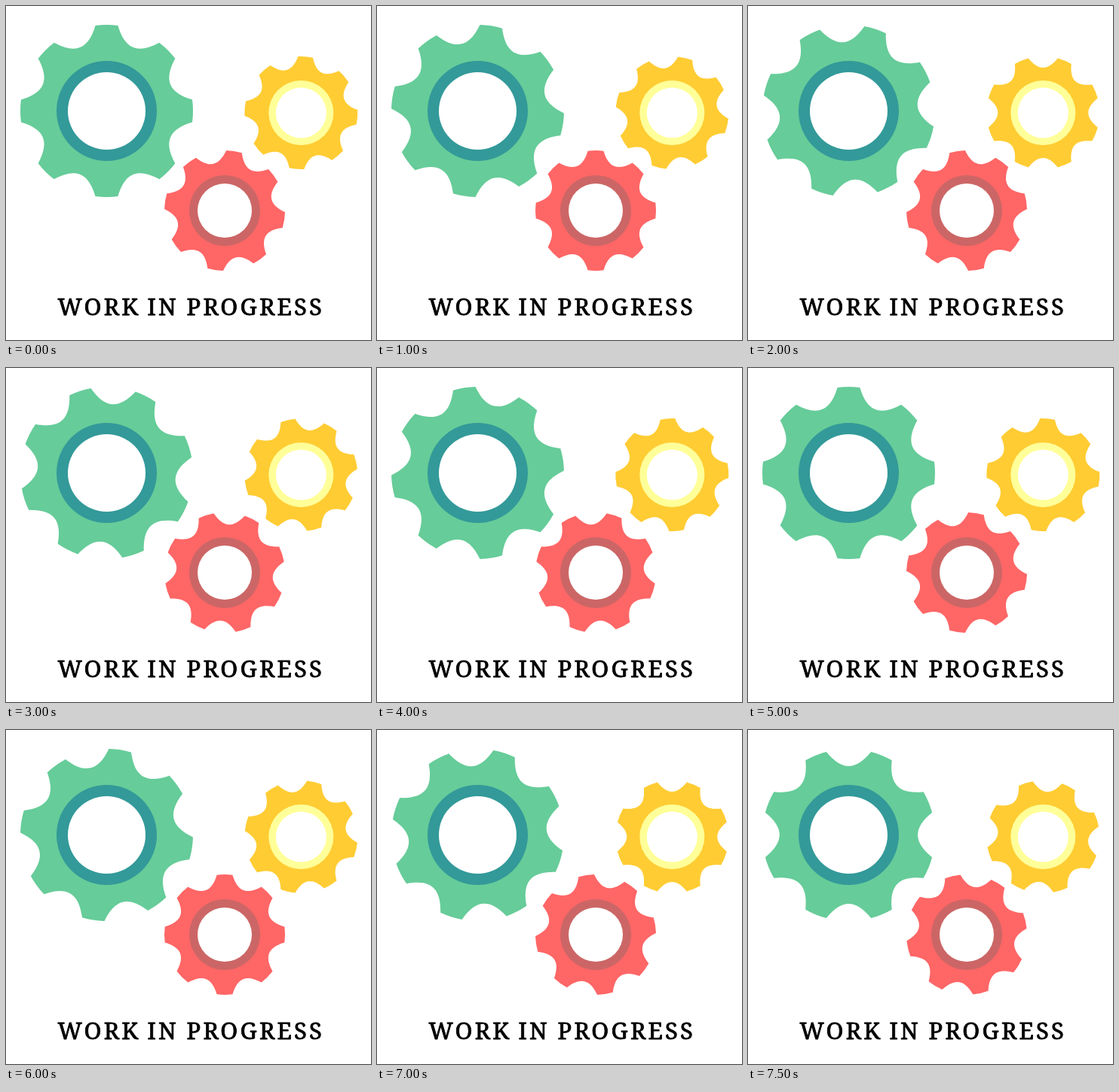
Write an HTML page with a canvas that moves like this. It is 484x444 px and loops after 8 s.

```html
<!DOCTYPE html>
<html lang="en">
<head>
<meta charset="utf-8">
<title>Work in progress</title>
<style>
html, body { margin: 0; width: 100%; height: 100%; overflow: hidden; background: #fff; }
canvas { display: block; }
</style>
</head>
<body>
<canvas id="stage" width="484" height="444"></canvas>
<script>
const ctx = document.getElementById('stage').getContext('2d');
const RAD = Math.PI / 180;
const LOOP = 8000, STEP = 500;
const SPEED = 9; // degrees per second

const TEETH = 8, PITCH = 2 * Math.PI / TEETH;
const HALF_TOOTH = 7.5 * RAD;
const ROOT = 0.8; // valley depth relative to the outer radius

// Control points of the valley curve, for an outer radius of 1
const rim = Math.cos(PITCH / 2 - HALF_TOOTH);
const pull = (4 * ROOT - rim) / 3;
const spread = 0.08;

const gears = [
  { x: 133.5, y: 139.5, r: 114.5, ring: 66.5, hole: 51.5, phase: 0, dir: 1, body: '#66cc99', rim: '#339999' },
  { x: 391.3, y: 142, r: 75, ring: 43, hole: 33.5, phase: 4.5, dir: 1, body: '#ffcc33', rim: '#ffff99' },
  { x: 290, y: 272, r: 80, ring: 47, hole: 36, phase: 9, dir: -1, body: '#ff6666', rim: '#cc6666' }
];

const words = [['WORK', 68.5], ['IN', 187.5], ['PROGRESS', 239.5]];

function disc(x, y, r, color) {
  ctx.beginPath();
  ctx.arc(x, y, r, 0, 2 * Math.PI);
  ctx.fillStyle = color;
  ctx.fill();
}

function drawGear(g, sec) {
  const turn = (g.phase + g.dir * SPEED * sec - 90) * RAD;
  // Point at a distance along a direction, shifted sideways
  const at = (dir, along, side) => [
    g.x + g.r * (along * Math.cos(dir) - side * Math.sin(dir)),
    g.y + g.r * (along * Math.sin(dir) + side * Math.cos(dir))
  ];
  ctx.beginPath();
  for (let i = 0; i < TEETH; i++) {
    const tooth = turn + i * PITCH;
    const gap = tooth + PITCH / 2;
    ctx.arc(g.x, g.y, g.r, tooth - HALF_TOOTH, tooth + HALF_TOOTH);
    ctx.bezierCurveTo(...at(gap, pull, -spread), ...at(gap, pull, spread),
      ...at(tooth + PITCH - HALF_TOOTH, 1, 0));
  }
  ctx.closePath();
  ctx.fillStyle = g.body;
  ctx.fill();
  disc(g.x, g.y, g.ring, g.rim);
  disc(g.x, g.y, g.hole, '#fff');
}

function drawText() {
  ctx.fillStyle = ctx.strokeStyle = '#000';
  ctx.lineWidth = 0.8;
  ctx.lineJoin = 'round';
  ctx.font = '500 31px "Noto Serif", serif';
  ctx.letterSpacing = '3.2px';
  for (const [word, x] of words) {
    ctx.fillText(word, x, 410.5);
    ctx.strokeText(word, x, 410.5);
  }
}

const start = performance.now();

function frame() {
  const t = (performance.now() - start) % LOOP;
  const sec = Math.floor(t / STEP) * STEP / 1000;
  ctx.fillStyle = '#fff';
  ctx.fillRect(0, 0, 484, 444);
  for (const g of gears) drawGear(g, sec);
  drawText();
  requestAnimationFrame(frame);
}
frame();
</script>
</body>
</html>
```
